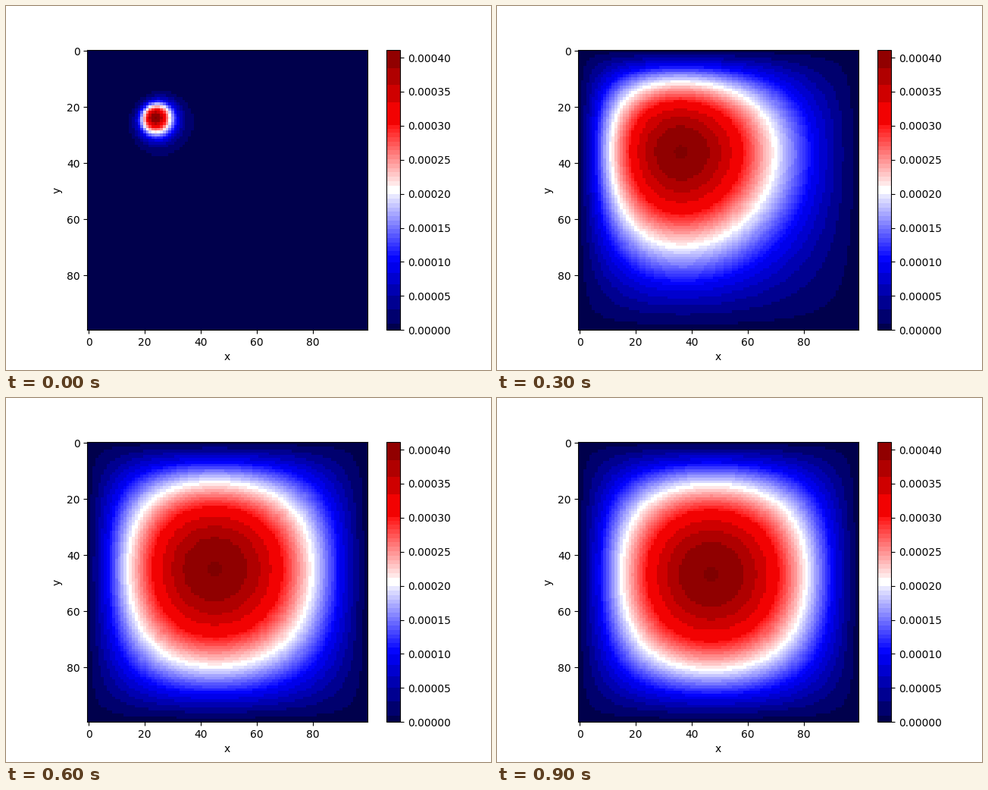
Recreate the animation shown at these times as a matplotlib script. Size 640 by 480 pixels, loop 1 s.

```python
import numpy as np
import matplotlib.pyplot as plt
from matplotlib.animation import FuncAnimation
from matplotlib.colors import ListedColormap

SIZE = 100
SOURCE = 25
PEAK = 0.0004116
FRAMES = 10
SWEEPS_FIRST, SWEEPS_STEP = 18, 390
TILT = 0.0016  # absorption seen by the in-place sweep

modes = np.arange(1, SIZE - 1) * np.pi / (SIZE - 1)
cells = np.arange(SIZE)
sines = np.sin(np.outer(modes, cells))
decay = (np.cos(modes)[:, None] + np.cos(modes)[None, :]) / 2
here, before = sines[:, SOURCE], sines[:, SOURCE - 1]
weights = np.outer(before, here) + np.outer(here, before)


def diffused(sweeps):
    """Point source after in-place relaxation sweeps with zero borders.

    Every antidiagonal holds a random walk of a different length, because
    a sweep reuses the values it has just written above and to the left.
    """
    field = np.zeros((SIZE, SIZE))
    for diagonal in range(2 * SIZE - 1):
        steps = 2 * sweeps - 1 + diagonal - 2 * SOURCE
        if steps < 0:
            continue
        rows = np.arange(max(0, diagonal - SIZE + 1), min(SIZE, diagonal + 1))
        cols = diagonal - rows
        mixed = sines[:, rows].T @ (weights * decay ** steps)
        values = np.sum(mixed * sines[:, cols].T, axis=1)
        field[rows, cols] = values * np.exp(-TILT * diagonal)
    field = np.clip(field, 0, None)
    return field / field.max() * PEAK


def banded_seismic():
    """Seismic in flat bands: broad in the dark ends, fine near white."""
    lut = plt.get_cmap("seismic")(np.arange(256))
    edges = [0, 6, 19, 31, 42, 52, 62, *range(68, 125, 4),
             *range(132, 185, 4), 187, 208, 224, 239, 255, 256]
    bands = lut.copy()
    for low, high in zip(edges, edges[1:]):
        bands[low:high] = lut[low:high].mean(axis=0)
    bands[:6] = lut[0]
    bands[124:132] = 1
    return ListedColormap(bands)


fields = [diffused(SWEEPS_FIRST + SWEEPS_STEP * k) for k in range(FRAMES)]

fig = plt.figure(figsize=(6.4, 4.8), dpi=100)
ax = fig.add_subplot()
image = ax.imshow(fields[0], cmap=banded_seismic(), vmin=0, vmax=PEAK,
                  interpolation="nearest")
fig.colorbar(image, ax=ax)
ax.set_xlabel("x")
ax.set_ylabel("y")


def update(frame):
    image.set_data(fields[frame])
    return [image]


animation = FuncAnimation(fig, update, frames=FRAMES, interval=100,
                          repeat=True, repeat_delay=0, blit=False)
plt.show()
```
